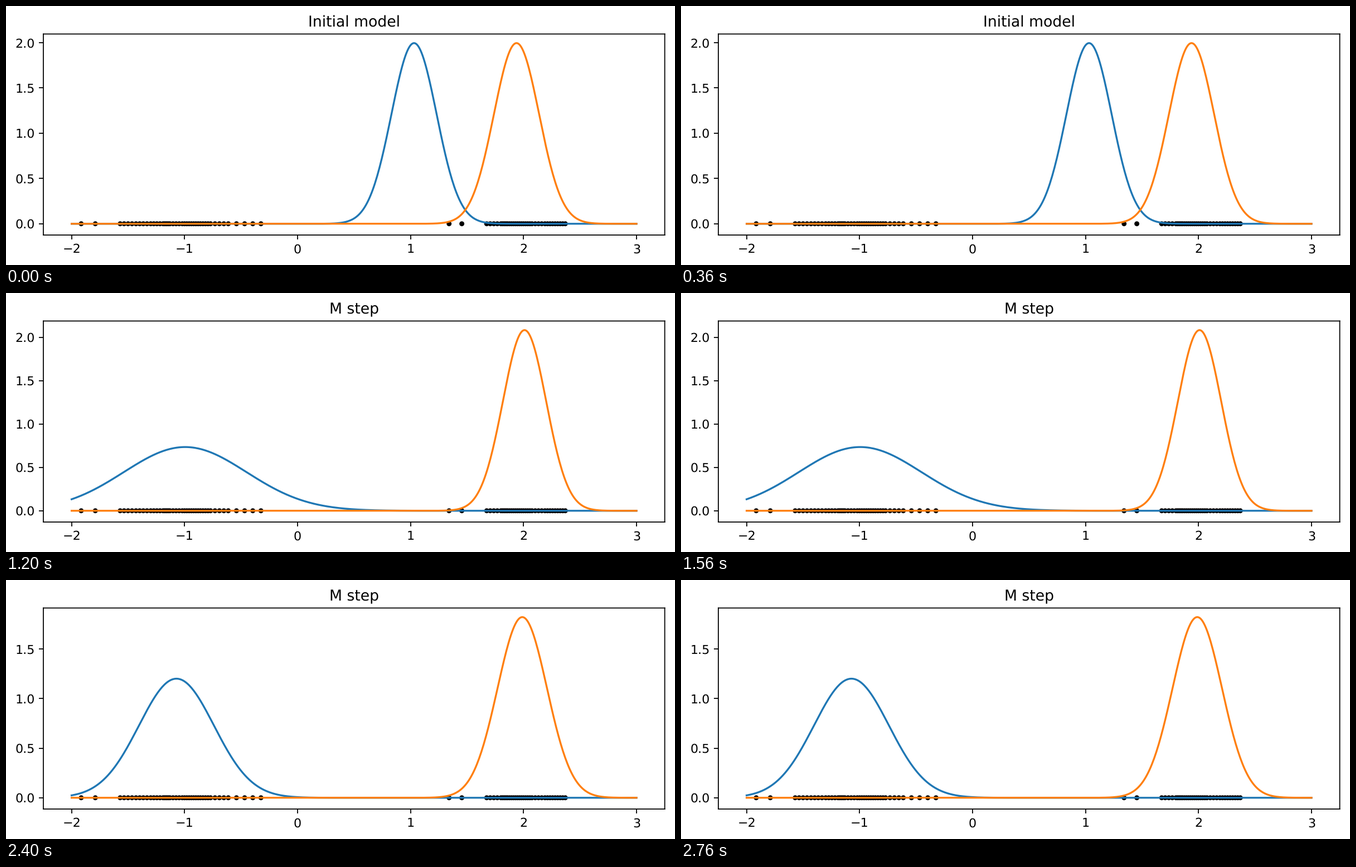
These frames come from a looping animation (1200 by 466 pixels, 3 s). A matplotlib script:

```python
"""Expectation-maximisation on a one-dimensional mixture of two Gaussians."""
import numpy as np
import matplotlib.pyplot as plt
from matplotlib.animation import FuncAnimation
from matplotlib.ticker import MultipleLocator

W, H, DPI = 1200, 466, 160
LEFT, RIGHT, TOP, BOTTOM = 67, 1181.6, 50.4, 412.1
ZERO_Y, PEAK_Y = 391.8, 66.7  # pixel rows of density 0 and of the highest peak

# (mean, standard deviation) of both components after each M step
MODELS = [
    [(1.031, 0.2), (1.938, 0.2)],
    [(-0.995, 0.543), (2.009, 0.1915)],
    [(-1.072, 0.332), (1.989, 0.2188)],
]
STEPS = [("Initial model", 0), ("E step", 0), ("M step", 1), ("E step", 1), ("M step", 2)]


def spread(knots, per_gap=4):
    """Fill each gap between the knots with evenly spaced samples."""
    positions = np.arange((len(knots) - 1) * per_gap + 1) / per_gap
    return np.interp(positions, np.arange(len(knots)), knots)


def density(x, mean, sd):
    return np.exp(-0.5 * ((x - mean) / sd) ** 2) / (sd * np.sqrt(2 * np.pi))


stragglers = [-1.915, -1.79, 1.341, 1.454]
left_group = spread([-1.57, -1.43, -1.3, -1.19, -1.13, -1.02, -0.94, -0.86, -0.77, -0.613, -0.324])
right_group = spread([1.674, 1.8, 1.86, 1.93, 2.0, 2.075, 2.19, 2.28, 2.37])
samples = np.concatenate([stragglers, left_group, right_group])


def sample_colors(title, model):
    if title != "E step":
        return ["black"] * len(samples)
    first, second = (density(samples, *part) for part in model)
    return np.where(first > second, "blue", "orange").tolist()


plt.rcParams.update({"font.family": "DejaVu Sans", "text.hinting": "none"})
fig = plt.figure(figsize=(W / DPI, H / DPI), dpi=DPI, facecolor="white")
ax = fig.add_axes([LEFT / W, 1 - BOTTOM / H, (RIGHT - LEFT) / W, (BOTTOM - TOP) / H])
ax.set_xlim(-2.25, 3.25)
ax.xaxis.set_major_locator(MultipleLocator(1))
ax.yaxis.set_major_locator(MultipleLocator(0.5))
for spine in ax.spines.values():
    spine.set_snap(False)

grid = np.linspace(-2, 3, 500)
dots = ax.scatter(samples, np.zeros_like(samples), marker=".", s=36, c="black")
curves = [ax.plot(grid, 0 * grid, color=c)[0] for c in ("tab:blue", "tab:orange")]


def draw(step):
    title, index = STEPS[step]
    model = MODELS[index]
    for curve, part in zip(curves, model):
        curve.set_ydata(density(grid, *part))
    peak = max(density(mean, mean, sd) for mean, sd in model)
    unit = peak / (ZERO_Y - PEAK_Y)
    ax.set_ylim((ZERO_Y - BOTTOM) * unit, (ZERO_Y - TOP) * unit)
    dots.set_color(sample_colors(title, model))
    ax.set_title(title, fontsize=12)
    return [dots, *curves]


anim = FuncAnimation(fig, draw, frames=len(STEPS), interval=600, repeat=True, repeat_delay=0)
plt.show()
```
